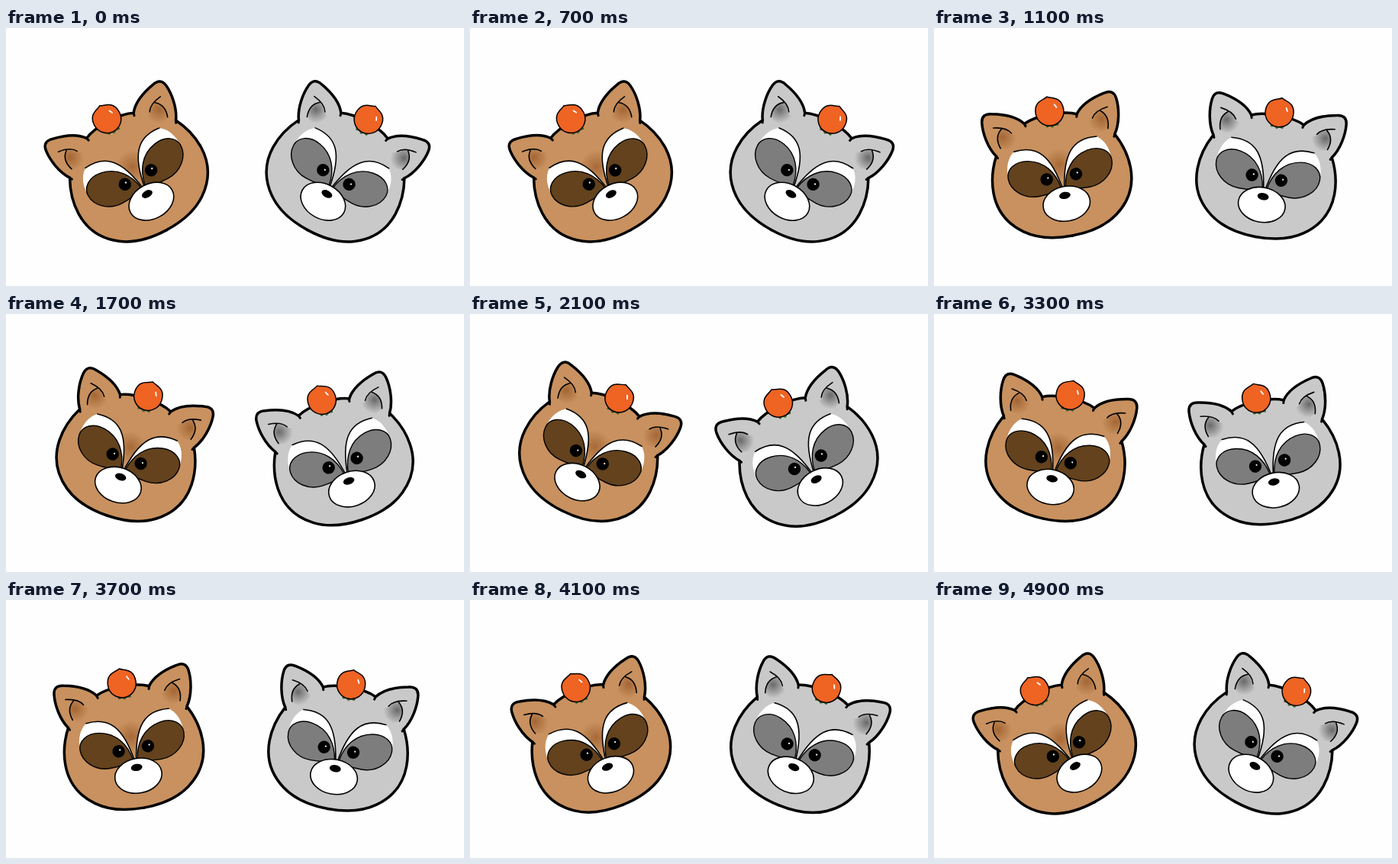
Animation of 600 by 338 pixels, one loop 5300 ms. Source, as an HTML page:

```html
<!DOCTYPE html>
<html lang="en">
<head>
<meta charset="utf-8">
<title>Two tilting heads</title>
<style>
html, body { margin: 0; width: 100%; height: 100%; overflow: hidden; background: #fefefe; }
svg { display: block; width: 600px; height: 338px; }
</style>
</head>
<body>
<svg id="stage" viewBox="0 0 600 338" stroke-linecap="round" stroke-linejoin="round"></svg>
<script>
const LOOP = 5300, TICK = 100, SWING = 2000, GO = 690, BACK = 2892;

const HEADS = [
  { id: 'brown', fur: '#c8915f', patch: '#63421d', shade: '#8a4a18', bridge: .55, ear: .6,
    pivot: [172.2, 175.5], offset: [-8.8, 18], from: -28.4, to: 29.8 },
  { id: 'grey', fur: '#c9c9c9', patch: '#7d7d7d', shade: '#4a4a4a', bridge: 0, ear: .75,
    pivot: [436.3, 185.4], offset: [1.5, 10.7], from: 28.8, to: -30 }
];

// Both halves of the face share the same drawing, mirrored on the nose axis.
const both = art => art + `<g transform="scale(-1 1)">${art}</g>`;

const OUTLINE = `M0 -83 C12 -83 25 -82 35 -77
  C43 -88 60 -94.5 75 -97.5 C83 -99.5 88.5 -97 89.5 -88 C91 -75 88 -55 79 -42
  C88 -25 91.3 -8 91.3 5 C91.3 30 79.5 49 61.8 61.8 C45 74 23 78.6 0 78.6`;
const BROW = 'M55 -43.5C24 -47 8 -30 1 17';

const FRUIT = `<g transform="translate(.5 -86.6)">
  <path d="M-9 14L-7.5 19.5L-3 18.5L0 21L3.5 18.5L8 19.5L9 14Z" fill="#3c7a2c" stroke="#1d3d14" stroke-width=".6"/>
  <path d="M0 -19.8C5 -16.2 18.5 -17.5 18.5 0A18.5 18.5 0 0 1 -18.5 0C-18.5 -17.5 -5 -16.2 0 -19.8Z"
    fill="#ef6323" stroke="#000" stroke-width="1.5"/>
  <path d="M7.8 -8L9.8 -4" stroke="#fff" stroke-width="1.8"/></g>`;

function face(h) {
  const half = `<path d="${OUTLINE}" fill="${h.fur}" stroke="#000" stroke-width="3.5"/>`;
  const ear = `
    <path d="M66 -75C73 -70 75 -61 72 -51L44 -40L38 -60L55 -67C58 -72 62 -75 66 -75Z" fill="url(#${h.id}-ear)"/>
    <path d="M35 -77L34 -73.5M79 -42L77.5 -39" stroke="#000" stroke-width="3"/>
    <path d="M76 -79C67 -78 58 -75 54 -68M66 -75.5C73 -70 75 -61 71.5 -51" fill="none" stroke="#000" stroke-width="1.6"/>`;
  const eye = `
    <path d="${BROW}L38 0L68 -4C71 -20 66 -36 55 -43.5Z" fill="#fff"/>
    <path d="M3 14C6 -6 18 -24 40 -28C57 -31 69 -22 69 -10C69 6 53 20 34 20C20 20 10 18 3 14Z"
      fill="${h.patch}" stroke="#000" stroke-width="1.4"/>
    <path d="${BROW}" fill="none" stroke="#000" stroke-width="1.6"/>`;
  const pupil = x => `<circle cx="${x}" r="8.2"/><circle cx="${x + 2}" cy="-1.5" r="1.1" fill="#fff"/>`;
  const glow = (name, alpha, area) => `<radialGradient id="${h.id}-${name}" gradientUnits="userSpaceOnUse" ${area}>
    <stop stop-color="${h.shade}" stop-opacity="${alpha}"/>
    <stop offset="1" stop-color="${h.shade}" stop-opacity="0"/></radialGradient>`;
  return `<defs>
    ${glow('ear', h.ear, 'cx="66" cy="-65" r="18"')}
    ${glow('bridge', h.bridge, 'cx="0" cy="-16" r="21"')}</defs>
    <g id="${h.id}">
    ${both(half)}
    <path d="M0 -80V75" stroke="${h.fur}" stroke-width="2"/>
    ${both(ear)}
    <circle cy="-16" r="21" fill="url(#${h.id}-bridge)"/>
    ${both(eye)}${pupil(-19.5)}${pupil(19.5)}
    <ellipse cx=".3" cy="36" rx="31" ry="22.8" fill="#fff" stroke="#000" stroke-width="1.6"/>
    <ellipse cy="25" rx="7.5" ry="4.6"/>
    ${FRUIT}</g>`;
}

// The CSS "ease" curve, solved by bisection.
function ease(x) {
  if (x <= 0) return 0;
  if (x >= 1) return 1;
  const curve = (p, a, b) => 3 * (1 - p) ** 2 * p * a + 3 * (1 - p) * p * p * b + p ** 3;
  let lo = 0, hi = 1;
  for (let i = 0; i < 30; i++) {
    const mid = (lo + hi) / 2;
    if (curve(mid, .25, .25) < x) lo = mid; else hi = mid;
  }
  return curve(lo, .1, 1);
}

document.getElementById('stage').innerHTML = HEADS.map(face).join('');
const nodes = HEADS.map(h => document.getElementById(h.id));

function draw(now) {
  const t = Math.floor((now % LOOP) / TICK) * TICK;
  const k = ease((t - GO) / SWING) - ease((t - BACK) / SWING);
  HEADS.forEach((h, i) => {
    const angle = h.from + (h.to - h.from) * k;
    nodes[i].setAttribute('transform',
      `translate(${h.pivot}) rotate(${angle.toFixed(3)}) translate(${h.offset})`);
  });
}

const start = performance.now();
function tick() {
  draw(performance.now() - start);
  requestAnimationFrame(tick);
}
tick();
</script>
</body>
</html>
```
